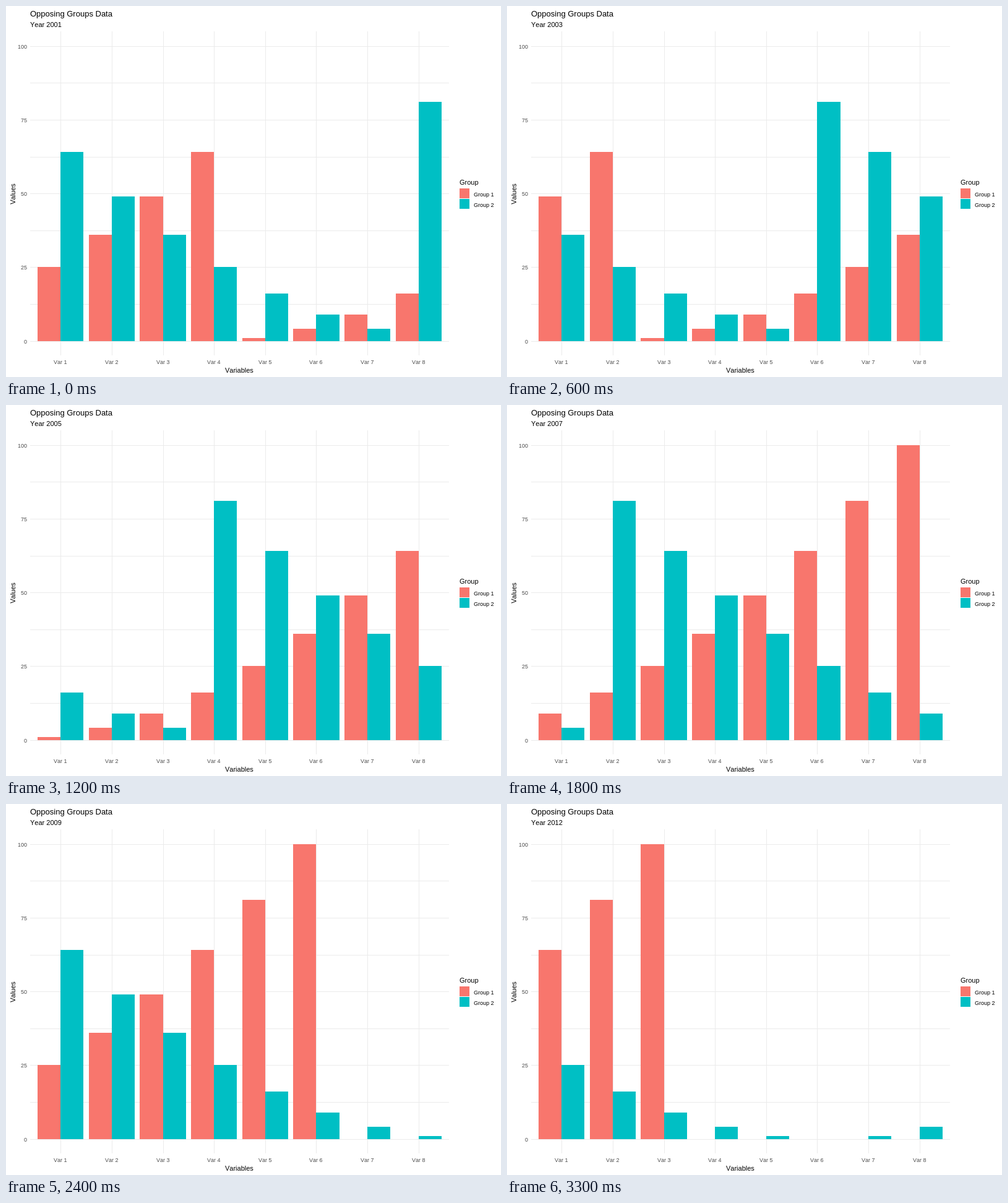
An HTML page with a canvas for the animation above (3600 ms loop, 800 px wide and 600 px high).

```html
<!DOCTYPE html>
<html lang="en">
<head>
<meta charset="utf-8">
<title>Opposing Groups Data</title>
<style>
  html, body { margin: 0; width: 100%; height: 100%; overflow: hidden; background: #fff; }
  canvas { display: block; }
</style>
</head>
<body>
<canvas id="chart" width="800" height="600"></canvas>
<script>
const ctx = document.getElementById('chart').getContext('2d');

const STEP_MS = 300, YEARS = 12, FIRST_YEAR = 2001, VARIABLES = 8;
const PANEL = { left: 39, top: 41, right: 716, bottom: 565 };
const CATEGORY_WIDTH = 82.63, BAR_WIDTH = 0.45;
const GRID = '#ebebeb', TICK = '#4d4d4d', BLACK = '#000';

// Each group is one series of squares that slides left by one variable per year.
const groups = [
  { name: 'Group 1', color: '#f8766d',
    value: s => s < 4 ? (s + 5) ** 2 : s < 14 ? (s - 3) ** 2 : 0 },
  { name: 'Group 2', color: '#00bfc4',
    value: s => s < 7 ? (8 - s) ** 2 : (16 - s) ** 2 },
];

const xAt = position => Math.round(88.3 + CATEGORY_WIDTH * position);
const yAt = value => Math.floor(542.07 - 4.768 * value);

function box(color, left, top, right, bottom) {
  ctx.fillStyle = color;
  ctx.fillRect(left, top, right - left, bottom - top);
}

function text(string, x, y, size, color = BLACK, align = 'left') {
  ctx.font = `${size}px "Liberation Sans", Arial, sans-serif`;
  ctx.fontKerning = 'none';
  ctx.textAlign = align;
  ctx.fillStyle = color;
  ctx.fillText(string, x, y);
}

function drawAxes() {
  for (let value = 0; value <= 100; value += 12.5) {
    const y = yAt(value);
    box(GRID, PANEL.left, y, PANEL.right, y + 1);
    if (value % 25 === 0) text(value, 34, y + 4, 9, TICK, 'right');
  }
  for (let i = 0; i < VARIABLES; i++) {
    const x = xAt(i);
    box(GRID, x, PANEL.top, x + 1, PANEL.bottom);
    text(`Var ${i + 1}`, x - 11, 579, 9, TICK);
  }
  text('Variables', 354, 593, 11);
  ctx.save();
  ctx.translate(15, 304);
  ctx.rotate(-Math.PI / 2);
  text('Values', 0, 0, 11, BLACK, 'center');
  ctx.restore();
}

function drawBars(year) {
  groups.forEach((group, g) => {
    for (let i = 0; i < VARIABLES; i++) {
      const left = i + (g - 1) * BAR_WIDTH;
      box(group.color, xAt(left), yAt(group.value(i + year)), xAt(left + BAR_WIDTH), yAt(0));
    }
  });
}

function drawLegend() {
  text('Group', 733, 289, 11);
  groups.forEach(({ name, color }, g) => {
    const top = 295 + 17 * g;
    box(color, 733, top, 749, top + 16);
    text(name, 756, top + 13, 9);
  });
}

function draw(now) {
  const year = Math.floor(now / STEP_MS) % YEARS;
  box('#fff', 0, 0, 800, 600);
  text('Opposing Groups Data', 39, 17, 13);
  text(`Year ${FIRST_YEAR + year}`, 39, 34, 11);
  drawAxes();
  drawBars(year);
  drawLegend();
}

const start = performance.now();
function tick() {
  draw(performance.now() - start);
  requestAnimationFrame(tick);
}
tick();
</script>
</body>
</html>
```
